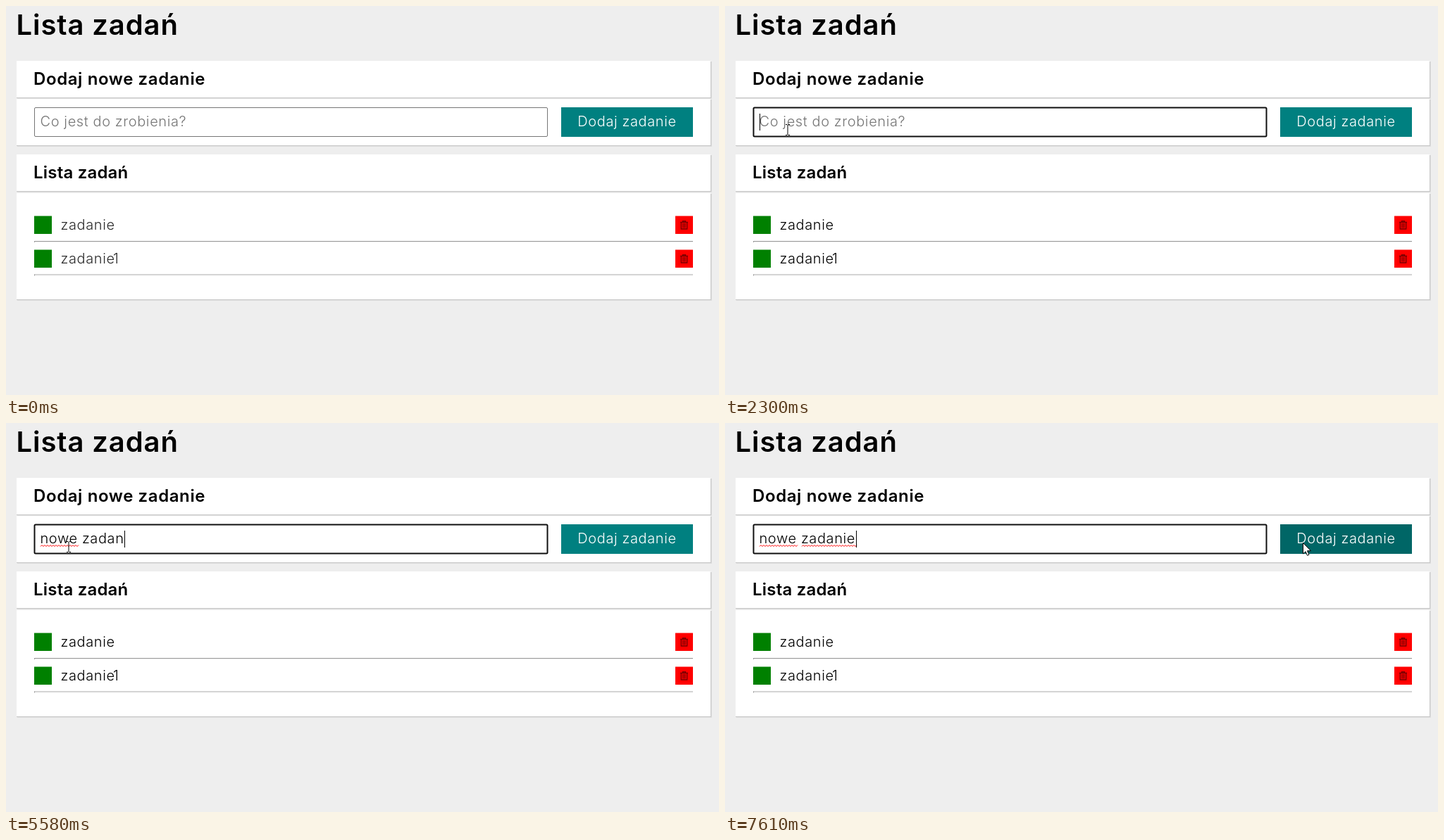
Write an HTML page that moves like this. It is 1012 by 553 pixels and loops after 7990 ms.

```html
<!DOCTYPE html>
<html lang="pl">
<head>
<meta charset="utf-8">
<title>Lista zadań</title>
<style>
  html, body { margin: 0; width: 100%; height: 100%; overflow: hidden; background: #eee; }
  svg { display: block; width: 100%; height: 100%; }
  text { font-family: Inter, "Open Sans", sans-serif; white-space: pre; }
  .head { font-weight: 600; font-size: 24px; }
  .body { font-weight: 300; font-size: 20px; letter-spacing: .6px; }
</style>
</head>
<body>
<svg viewBox="0 0 1012 553">
  <defs>
    <g id="trash">
      <rect width="25" height="25.5" fill="red"/>
      <g fill="none" stroke="#7c0000" stroke-width="1.4">
        <path d="M7 9H18M10.5 8.5V7.2H14.500V8.500M8.300 9.500V18.500H16.700V9.500"/>
        <path d="M10.700 10.500V17M12.500 10.500V17M14.300 10.500V17" stroke-width="1"/>
      </g>
    </g>
    <g id="rule">
      <path d="M40 .5H975" stroke="#9a9a9a"/>
      <path d="M41 1.500H975" stroke="#eee"/>
      <path d="M40.500 0V2" stroke="#9a9a9a"/>
    </g>
  </defs>
  <rect width="1012" height="553" fill="#eee"/>
  <text x="14.500" y="41" font-size="40" font-weight="600" letter-spacing=".9">Lista zadań</text>
  <g id="panels"></g>
  <text class="head" x="39" y="112" letter-spacing=".6">Dodaj nowe zadanie</text>
  <text class="head" x="39" y="245" letter-spacing=".2">Lista zadań</text>
  <rect id="button" x="788" y="144" width="187" height="42"/>
  <text class="body" x="881.500" y="171" fill="#fff" text-anchor="middle">Dodaj zadanie</text>
  <rect id="input" x="40.500" y="144.500" width="728" height="41" rx="1.500" fill="#fff"/>
  <text class="body" id="hint" x="48.500" y="171" fill="#757575">Co jest do zrobienia?</text>
  <text class="body" id="typed" x="48.500" y="171"></text>
  <g fill="none" stroke="#f00" stroke-width="1">
    <path id="wave1"/>
    <path id="wave2"/>
  </g>
  <rect id="caret" y="153" width="1" height="24"/>
  <g id="items">
    <text class="body" x="77.500" y="318">zadanie</text>
    <text class="body" x="77.500" y="365.500">zadanie<tspan dx="-2">1</tspan></text>
  </g>
  <g fill="#008000">
    <rect x="40" y="298.500" width="25" height="25.500"/>
    <rect x="40" y="346.500" width="25" height="25.500"/>
  </g>
  <use href="#trash" x="950" y="298.500"/>
  <use href="#trash" x="950" y="346.500"/>
  <use href="#rule" y="334"/>
  <use href="#rule" y="381.500"/>
  <g id="pointer">
    <path id="arrow" d="M.5 .5V16L4 12.700L6.500 18.300L9 17.200L6.500 11.700H11.500Z" fill="#fff" stroke="#000"/>
    <path id="beam" d="M-3 -7.500H-1L0 -6.500L1 -7.500H3M0 -6.500V6.500M-3 7.500H-1L0 6.500L1 7.500H3" fill="none" stroke="#000"/>
  </g>
</svg>
<script>
const LOOP = 7990;
const PHRASE = "nowe zadanie";
const FOCUS = 1240;
const BLINK = 530;
const KEYS = [2430, 2890, 3290, 3420, 3620, 3890, 4150, 4680, 4790, 5580, 5910, 6510];
const ENTER = { start: 330, step: 64, points: [[14, 189], [27, 186], [46, 182], [68, 179], [82, 178], [89, 177]] };
const LEAVE = {
  start: 6710, step: 68.2,
  points: [[113, 177], [160, 179], [235, 184], [335, 190], [455, 196], [575, 198],
           [680, 198], [755, 195], [798, 186], [814, 177], [819, 172], [820, 170]]
};

const $ = id => document.getElementById(id);
const show = (id, on) => $(id).setAttribute("visibility", on ? "visible" : "hidden");
const set = (id, attrs) => {
  for (const name in attrs) $(id).setAttribute(name, attrs[name]);
};

function panel(y, h) {
  const bar = (x, y, w, h, fill) => `<rect x="${x}" y="${y}" width="${w}" height="${h}" fill="${fill}"/>`;
  return bar(16, y + 1, 986, h + 1, "#dedede") + bar(15, y + 1, 986, h, "#c8c8c8") + bar(15, y, 985, h, "#fff");
}

function wave(from, to) {
  let d = `M${from} 175.500`;
  for (let x = from + 2, up = true; x <= to; x += 2, up = !up) d += `L${x} ${up ? 173.5 : 175.5}`;
  return d;
}

function along(path, t) {
  const i = Math.floor((t - path.start) / path.step + 0.02);
  return path.points[Math.max(0, Math.min(i, path.points.length - 1))];
}

function mouseAt(t) {
  if (t >= LEAVE.start) return along(LEAVE, t);
  return t < 1570 ? along(ENTER, t) : [89, 176];
}

const inside = ([x, y], left, right) => x >= left && x <= right && y >= 144 && y <= 186;

function draw(t) {
  const mouse = mouseAt(t);
  const overInput = t >= ENTER.start && inside(mouse, 40, 769);
  const overButton = inside(mouse, 788, 975);
  const focused = t >= FOCUS;

  show("pointer", t >= ENTER.start);
  set("pointer", { transform: `translate(${mouse})` });
  show("beam", overInput);
  show("arrow", t >= ENTER.start && !overInput);

  set("input", {
    stroke: focused ? "#101010" : overInput ? "#4f4f4f" : "#767676",
    "stroke-width": focused ? 2 : 1
  });
  set("button", { fill: overButton ? "#006666" : "#008080" });
  set("items", { fill: t < 1370 ? "#2c2c2c" : "#000" });

  const count = KEYS.filter(k => k <= t).length;
  const lastKey = count ? KEYS[count - 1] : FOCUS;
  $("typed").textContent = PHRASE.slice(0, count);
  show("hint", !count);
  const width = count ? $("typed").getComputedTextLength() : 0;
  set("caret", { x: Math.round(49 + width) });
  show("caret", focused && (t - lastKey) % (2 * BLINK) < BLINK);
  show("wave1", t >= 3690);
  show("wave2", t >= 7530);
}

$("panels").innerHTML = panel(78, 52) + panel(132, 66) + panel(211, 52) + panel(266, 151);
set("wave1", { d: wave(49, 103) });
set("wave2", { d: wave(109, 187) });

const begin = performance.now();
function tick() {
  draw((performance.now() - begin) % LOOP);
  requestAnimationFrame(tick);
}
tick();
</script>
</body>
</html>
```
